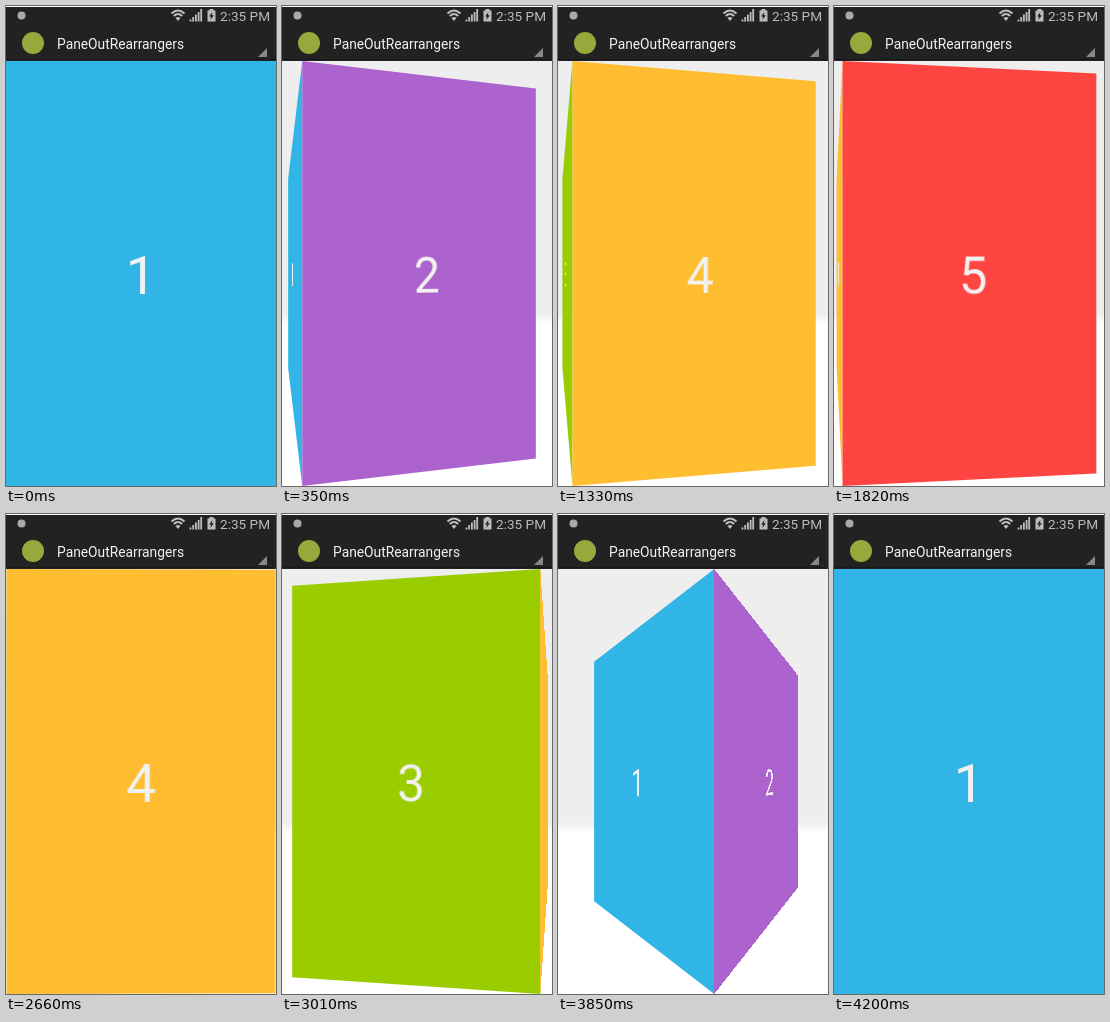
Animation of 270 by 480 pixels, one loop 4.27 s. Source, as an HTML page:

```html
<!DOCTYPE html>
<html lang="en">
<head>
<meta charset="utf-8">
<title>Cube pager</title>
<style>
  html, body { margin: 0; width: 100%; height: 100%; overflow: hidden; background: #fff; }
  #stage {
    position: relative; width: 270px; height: 480px; overflow: hidden;
    background: linear-gradient(#eee 308px, #fff 319px);
    font-family: Roboto, "Noto Sans", sans-serif;
  }
  .page {
    position: absolute; left: 0; top: 55px; width: 270px; height: 425px;
    font-size: 54px; line-height: 430px; text-align: center; color: #f1f1f1;
  }
  svg { position: absolute; left: 0; top: 0; }
</style>
</head>
<body>
<div id="stage">
  <svg id="bars" width="270" height="55" viewBox="0 0 270 55">
    <rect width="270" height="55" fill="#222"/>
    <rect width="270" height="1" fill="#fff"/>
    <rect y="53" width="270" height="1" fill="#191919"/>
    <circle cx="15.5" cy="9.5" r="4" fill="#aaa"/>
    <g fill="none" stroke="#bdbdbd" stroke-width="2">
      <path d="M165.5 7.5Q172 1.5 178.5 7.5M167.8 10Q172 6 176.2 10"/>
      <path d="M172 15l-2.5-3q2.5-2 5 0z" fill="#bdbdbd" stroke="none"/>
      <path d="M184.500 15.500v-2M187.200 15.500v-4.500M189.900 15.500v-7M192.600 15.500v-9.500M195.200 15.500v-12.500" stroke-width="1.8"/>
    </g>
    <path d="M203.500 3h4v1.500h2v11h-8v-11h2z" fill="#bdbdbd"/>
    <path d="M206.500 6l-3.500 4.500h2l-.8 3.500 3.800-4.800h-2.200z" fill="#222"/>
    <text x="214" y="14.500" font-size="13.600" fill="#bdbdbd">2:35 PM</text>
    <circle cx="27" cy="37" r="11" fill="#98a83c"/>
    <text x="51" y="42.700" font-size="13.800" fill="#f3f3f3">PaneOutRearrangers</text>
    <path d="M261 42v9h-9z" fill="#888"/>
  </svg>
</div>
<script>
const LOOP = 4270, STEP = 70, WIDTH = 270, DEPTH = 214.6;
const DRAG = 150, FLING = 360, DRAGGED = 0.4;
const colors = ["#31b5e7", "#ad63ce", "#9acd00", "#ffbd31", "#ff4542"];
const forward = [20, 512, 981, 1445];
const backward = [2140, 2650, 3125, 3660];

const stage = document.getElementById("stage");
const pages = colors.map((color, i) => {
  const page = document.createElement("div");
  page.className = "page";
  page.textContent = i + 1;
  page.style.background = color;
  stage.insertBefore(page, document.getElementById("bars"));
  return page;
});

// One swipe: the finger speeds up, then the released page settles.
function swipe(time) {
  if (time <= 0) return 0;
  if (time < DRAG) return DRAGGED * (time / DRAG) ** 2;
  const rest = Math.max(0, 1 - (time - DRAG) / FLING);
  return 1 - (1 - DRAGGED) * rest ** 3;
}

const total = (starts, time) => starts.reduce((sum, s) => sum + swipe(time - s), 0);

function draw(time) {
  const scroll = total(forward, time) - total(backward, time);
  pages.forEach((page, i) => {
    const offset = i - scroll;
    page.style.visibility = Math.abs(offset) < 0.999 ? "visible" : "hidden";
    page.style.transformOrigin = offset < 0 ? "100% 50%" : "0 50%";
    page.style.transform =
      `translateX(${offset * WIDTH}px) perspective(${DEPTH}px) rotateY(${offset * 90}deg)`;
  });
}

const begin = performance.now();
function tick() {
  const time = (performance.now() - begin) % LOOP;
  draw(Math.floor(time / STEP) * STEP);
  requestAnimationFrame(tick);
}
tick();
</script>
</body>
</html>
```
